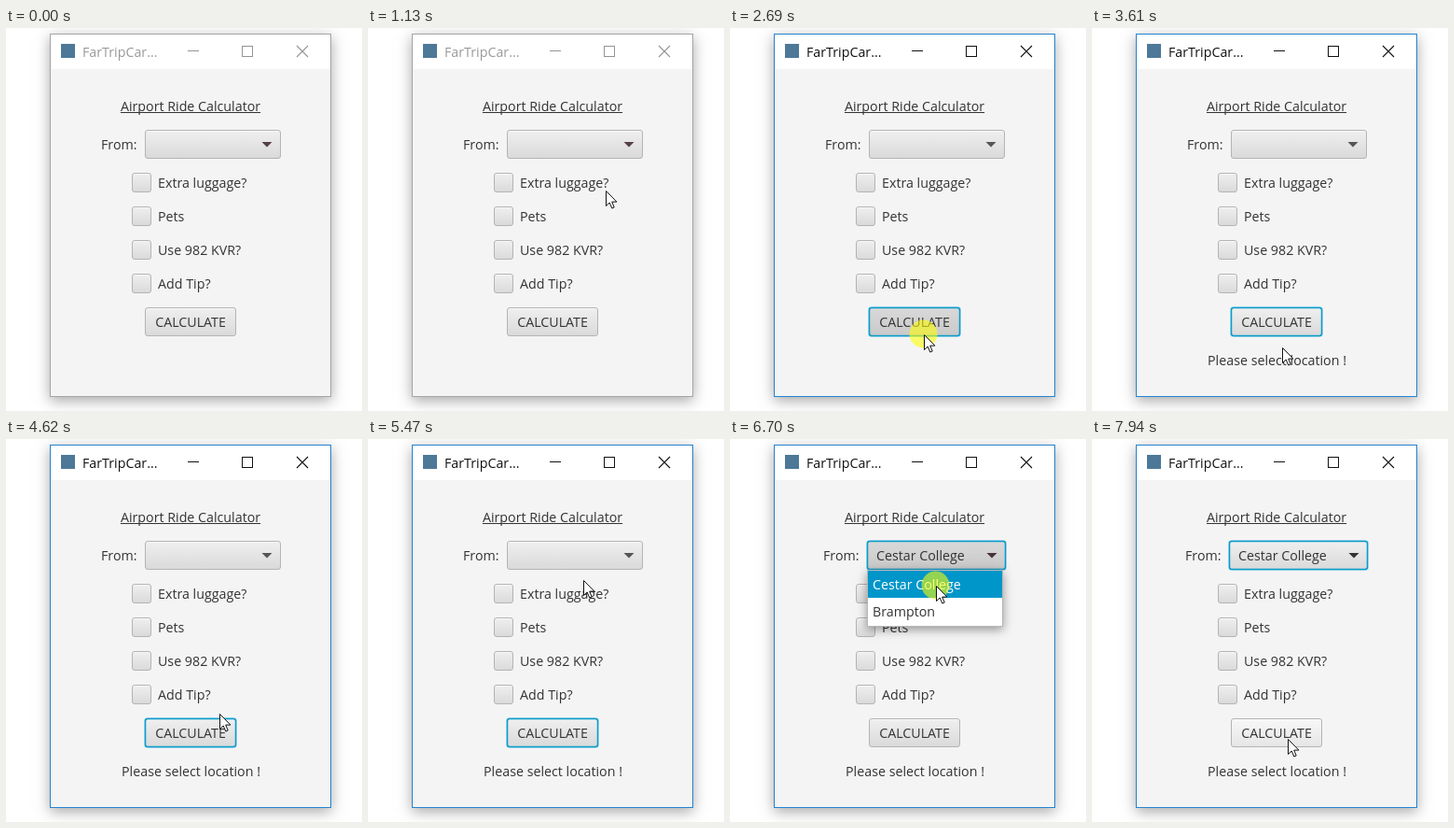
An HTML page with a canvas that plays this animation: 382 px wide and 410 px high, repeating every 8000 ms.

```html
<!DOCTYPE html>
<html lang="en">
<head>
<meta charset="utf-8">
<title>Airport Ride Calculator</title>
<style>
  html, body { margin: 0; width: 100%; height: 100%; overflow: hidden; background: #fff; }
  canvas { display: block; }
</style>
</head>
<body>
<canvas id="stage" width="382" height="410"></canvas>
<script>
const ctx = document.getElementById('stage').getContext('2d');
const LOOP = 8000;
const FONT = '14.25px "Open Sans", "Noto Sans", sans-serif';
const INK = '#333';

// Moments at which the interface changes state
const PRESS = 2612, RELEASE = 2770, OPEN = 5930, PICK = 6630, CLOSE = 6780, LEAVE = 7170;

// Pointer moves: first step, last step, number of steps, waypoints
const moves = [
  [420, 420, 1, [248, 300]],
  [500, 500, 1, [249, 296]],
  [820, 1190, 6, [247, 240], [256, 162]],
  [1430, 1830, 6, [271, 119], [240, 150]],
  [2060, 2060, 1, [220, 196]],
  [2139, 2533, 6, [208, 328]],
  [3450, 3610, 3, [204, 342]],
  [3910, 4300, 6, [186, 356], [204, 370]],
  [4620, 4620, 1, [229, 294]],
  [4690, 4690, 1, [229, 290]],
  [5010, 5700, 10, [240, 200], [225, 113]],
  [6180, 6480, 5, [221, 157]],
  [7170, 7330, 3, [220, 297]],
  [7710, 7940, 4, [210, 321]]
];

const between = (t, a, b) => t >= a && t < b;
const ease = p => p * p * (3 - 2 * p);

function pointerAt(t) {
  let pos = null;
  for (const [start, end, steps, ...points] of moves) {
    if (t < start) break;
    const gap = (end - start) / (steps - 1) || 1;
    const step = Math.min(steps, Math.floor((t - start) / gap + 1e-6) + 1);
    const path = [pos || points[0], ...points];
    const along = ease(step / steps) * points.length;
    const i = Math.min(points.length - 1, Math.floor(along));
    const mix = k => Math.round(path[i][k] + (path[i + 1][k] - path[i][k]) * (along - i));
    pos = [mix(0), mix(1)];
  }
  return pos;
}

function label(text, x, y, color = INK, align = 'left') {
  ctx.font = FONT;
  ctx.fillStyle = color;
  ctx.textAlign = align;
  ctx.fillText(text, x, y);
}

function strokePath(color, width, ...lines) {
  ctx.strokeStyle = color;
  ctx.lineWidth = width;
  ctx.beginPath();
  for (const [x1, y1, x2, y2] of lines) {
    ctx.moveTo(x1, y1);
    ctx.lineTo(x2, y2);
  }
  ctx.stroke();
}

function withShadow(color, blur, offset, draw) {
  ctx.save();
  ctx.shadowColor = color;
  ctx.shadowBlur = blur;
  ctx.shadowOffsetY = offset;
  draw();
  ctx.restore();
}

function roundBox(x, y, w, h, r) {
  ctx.beginPath();
  ctx.roundRect(x, y, w, h, r);
}

const tones = {
  normal: ['#f0f0f0', '#d9d9d9'],
  hover: ['#f8f8f8', '#e5e5e5'],
  pressed: ['#d9d9d9', '#c9c9c9']
};

function control(x, y, w, h, tone = 'normal', focused = false) {
  const [top, bottom] = tones[tone];
  const fill = ctx.createLinearGradient(0, y, 0, y + h);
  fill.addColorStop(0, top);
  fill.addColorStop(1, bottom);
  if (focused) {
    roundBox(x - 1, y - 1, w + 2, h + 2, 4);
    ctx.fillStyle = 'rgba(3, 158, 211, 0.25)';
    ctx.fill();
  }
  roundBox(x + 0.5, y + 0.5, w - 1, h - 1, 2.5);
  ctx.fillStyle = fill;
  ctx.fill();
  ctx.lineWidth = 1;
  if (!focused) strokePath('rgba(255, 255, 255, 0.6)', 1, [x + 2, y + 1.5, x + w - 2, y + 1.5]);
  roundBox(x + 0.5, y + 0.5, w - 1, h - 1, 2.5);
  ctx.strokeStyle = focused ? '#0a9bcb' : '#b4b4b4';
  ctx.lineWidth = focused ? 1.5 : 1;
  ctx.stroke();
}

function drawWindow(active) {
  ctx.fillStyle = '#fff';
  ctx.fillRect(0, 0, 382, 410);
  withShadow('rgba(0, 0, 0, 0.34)', 14, 4, () => ctx.fillRect(47, 6, 302, 389));
  ctx.fillStyle = '#f4f4f4';
  ctx.fillRect(48, 44, 300, 350);
  ctx.strokeStyle = active ? '#2583d0' : '#a5a5a5';
  ctx.lineWidth = 1;
  ctx.strokeRect(47.5, 6.5, 301, 388);

  ctx.fillStyle = '#4d7898';
  ctx.fillRect(59, 17, 15, 15);
  label('FarTripCar...', 82, 31, active ? '#111' : '#999');
  const glyph = active ? '#111' : '#949494';
  strokePath(glyph, 1, [195, 24.5, 207, 24.5]);
  ctx.strokeRect(253.5, 19.5, 11, 11);
  strokePath(glyph, 1.1, [312, 19, 324, 31], [324, 19, 312, 31]);
}

function drawCombo(t) {
  const chosen = t >= PICK;
  const x = chosen ? 147 : 149;
  const right = chosen ? 296 : 295;
  label('From:', chosen ? 100 : 102, 130);
  control(x, 109, right - x, 31, between(t, OPEN, CLOSE) ? 'pressed' : 'normal', t >= OPEN);
  if (chosen) label('Cestar College', 157, 130);

  const tip = right - 15;
  ctx.fillStyle = t < 1590 ? '#57404a' : t < OPEN ? '#555' : t < CLOSE ? '#49303c' : INK;
  ctx.beginPath();
  ctx.moveTo(tip - 5.5, 122);
  ctx.lineTo(tip + 5.5, 122);
  ctx.lineTo(tip, 127.5);
  ctx.fill();
}

function drawPopup(t, pointer) {
  const x = t >= PICK ? 147 : 149;
  const lit = pointer[1] > 141;
  ctx.fillStyle = '#fff';
  withShadow('rgba(0, 0, 0, 0.4)', 10, 3, () => ctx.fillRect(x, 140, 146, 61));
  ctx.strokeStyle = '#b8b8b8';
  ctx.lineWidth = 1;
  ctx.strokeRect(x + 0.5, 140.5, 145, 60);
  if (lit) {
    ctx.fillStyle = '#0096c9';
    ctx.fillRect(x + 1, 141, 144, 29);
  }
  label('Cestar College', x + 6, 161, lit ? '#fff' : INK);
  label('Brampton', x + 6, 190);
}

function drawForm(t, pointer) {
  const title = 'Airport Ride Calculator';
  label(title, 198, 89, INK, 'center');
  const half = ctx.measureText(title).width / 2;
  strokePath(INK, 1, [198 - half, 90.5, 198 + half, 90.5]);

  drawCombo(t);
  ['Extra luggage?', 'Pets', 'Use 982 KVR?', 'Add Tip?'].forEach((text, i) => {
    const y = 155 + 36 * i;
    control(135, y, 21, 21, i === 0 && between(t, CLOSE, LEAVE) ? 'hover' : 'normal');
    label(text, 163, y + 16);
  });

  const over = pointer && between(pointer[0], 149, 247) && between(pointer[1], 299, 330);
  const tone = between(t, PRESS, RELEASE) ? 'pressed' : over ? 'hover' : 'normal';
  control(149, 299, 98, 31, tone, between(t, PRESS, OPEN));
  label('CALCULATE', 198, 320, INK, 'center');
  if (t >= RELEASE) label('Please select location !', 198.5, 361, INK, 'center');
}

function drawPointer([x, y], clicking) {
  if (clicking) {
    ctx.fillStyle = 'rgba(255, 255, 0, 0.58)';
    ctx.beginPath();
    ctx.arc(x - 0.5, y - 0.5, 15, 0, Math.PI * 2);
    ctx.fill();
  }
  ctx.save();
  ctx.translate(x + 0.5, y + 0.5);
  ctx.fillStyle = '#fff';
  ctx.strokeStyle = '#111';
  ctx.lineWidth = 1;
  const arrow = new Path2D('M0 0V16L3.7 12.5L6.3 18.5L8.7 17.5L6.2 11.6H11.4Z');
  ctx.fill(arrow);
  ctx.stroke(arrow);
  ctx.restore();
}

function render(t) {
  const pointer = pointerAt(t);
  drawWindow(t >= PRESS);
  drawForm(t, pointer);
  if (between(t, OPEN, CLOSE)) drawPopup(t, pointer);
  if (pointer) drawPointer(pointer, between(t, PRESS, RELEASE) || between(t, PICK, CLOSE));
}

const began = performance.now();
function tick() {
  render((performance.now() - began) % LOOP);
  requestAnimationFrame(tick);
}
tick();
</script>
</body>
</html>
```
